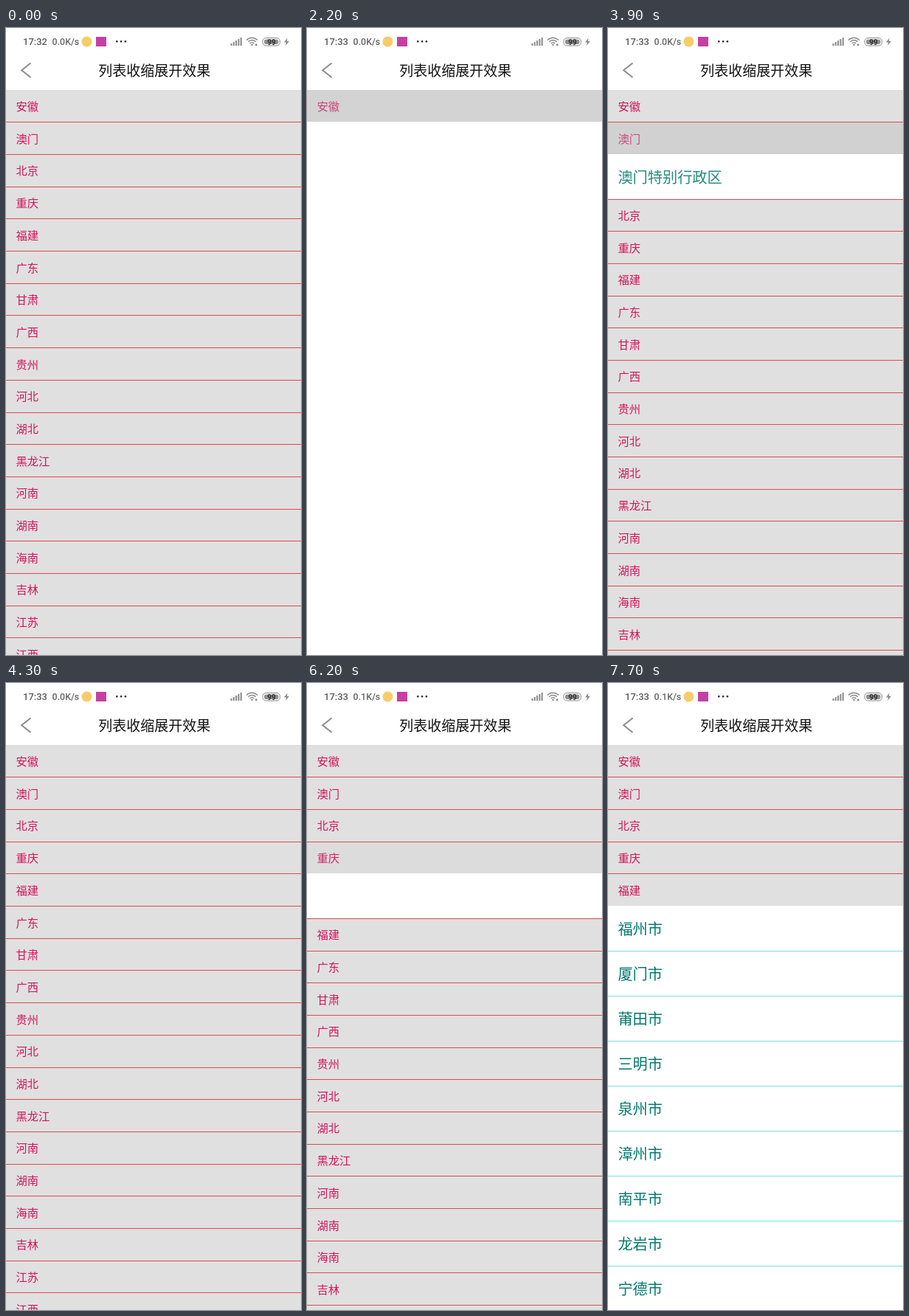
Recreate the animation shown at these times as an HTML page with a canvas. Size 400 by 850 pixels, loop 8000 ms.

```html
<!DOCTYPE html>
<html lang="zh-CN">
<head>
<meta charset="utf-8">
<title>列表收缩展开效果</title>
<style>
  html, body { margin: 0; width: 100%; height: 100%; overflow: hidden; background: #fff; }
  canvas { display: block; width: 400px; height: 850px; }
</style>
</head>
<body>
<canvas id="stage"></canvas>
<script>
const W = 400, H = 850, LOOP = 8000, STEP = 100;
const TOP = 84.2, ROW = 43.68, CHILD = 60.98, DIVIDER = 0.4;
const CJK = '"Noto Sans CJK SC", "Noto Sans CJK", sans-serif';
const LATIN = 'Roboto, sans-serif';

const groups = '安徽 澳门 北京 重庆 福建 广东 甘肃 广西 贵州 河北 湖北 黑龙江 河南 湖南 海南 吉林 江苏 江西'.split(' ');
const cities = {
  安徽: '合肥市 芜湖市 蚌埠市 淮南市 马鞍山市 淮北市 铜陵市 安庆市 黄山市 滁州市 阜阳市 宿州市 六安市 亳州市 池州市 宣城市'.split(' '),
  澳门: ['澳门特别行政区'],
  北京: ['北京市'],
  重庆: ['重庆市'],
  福建: '福州市 厦门市 莆田市 三明市 泉州市 漳州市 南平市 龙岩市 宁德市'.split(' ')
};

// Taps on group headers: each one toggles its group.
const taps = [
  { name: '澳门', at: 1010, open: true },
  { name: '安徽', at: 2010, open: true },
  { name: '安徽', at: 2964.5, open: false },
  { name: '澳门', at: 3885, open: false },
  { name: '北京', at: 4650, open: true },
  { name: '北京', at: 5310, open: false },
  { name: '重庆', at: 5950, open: true },
  { name: '重庆', at: 6570, open: false },
  { name: '福建', at: 7250, open: true }
];
const FADE = 120, MOVE = 250;
const stalls = [4000, 6900];

const canvas = document.getElementById('stage');
const ctx = canvas.getContext('2d');
const scale = window.devicePixelRatio || 1;
canvas.width = W * scale;
canvas.height = H * scale;

const clamp = x => Math.min(1, Math.max(0, x));
const ease = x => 0.5 - Math.cos(clamp(x) * Math.PI) / 2;

function rect(x, y, w, h, color) {
  ctx.fillStyle = color;
  ctx.fillRect(x, y, w, h);
}

function text(str, x, y, font, color, align = 'left') {
  ctx.font = font;
  ctx.fillStyle = color;
  ctx.textAlign = align;
  ctx.fillText(str, x, y);
}

function path(points, color, width) {
  ctx.beginPath();
  points.forEach(([x, y]) => ctx.lineTo(x, y));
  if (width) {
    ctx.strokeStyle = color;
    ctx.lineWidth = width;
    ctx.stroke();
  } else {
    ctx.fillStyle = color;
    ctx.fill();
  }
}

function pill(x, y, w, h, r, color, stroke) {
  ctx.beginPath();
  ctx.roundRect(x, y, w, h, r);
  if (stroke) {
    ctx.strokeStyle = color;
    ctx.lineWidth = 1;
    ctx.stroke();
  } else {
    ctx.fillStyle = color;
    ctx.fill();
  }
}

// Opening moves rows first, then fades children in; closing does the reverse.
function groupState(name, t) {
  const state = { size: 0, alpha: 0, press: 0 };
  for (const tap of taps) {
    if (tap.name !== name) continue;
    const s = t - tap.at;
    state.press = Math.max(state.press, 0.36 * Math.min(clamp((s + 60) / 60), clamp((285 - s) / 110)));
    if (s < 0) continue;
    if (tap.open) {
      state.size = ease(s / MOVE);
      state.alpha = clamp((s - MOVE) / FADE);
    } else {
      state.alpha = 1 - clamp(s / FADE);
      state.size = 1 - ease((s - FADE) / MOVE);
    }
  }
  return state;
}

function drawHeader(name, y, first, press) {
  const top = Math.floor(y), bottom = Math.floor(y + ROW);
  rect(0, top, W, bottom - top, '#e0e0e0');
  text(name, 13.5, y + 27.9, '15.3px ' + CJK, '#d4145a');
  if (press) rect(0, top, W, bottom - top, `rgba(180,180,180,${press})`);
  if (!first) rect(0, top, W, 1, '#db4b4f');
}

function drawChildren(list, y, alpha) {
  ctx.globalAlpha = alpha;
  list.forEach((city, i) => {
    const top = y + i * CHILD;
    if (top > H) return;
    text(city, 13.4, top + 38.3, '20.2px ' + CJK, '#00796b');
    if (i < list.length - 1) rect(0, Math.floor(top + CHILD - DIVIDER), W, 1, '#80dede');
  });
  ctx.globalAlpha = 1;
}

function drawList(t) {
  ctx.save();
  ctx.beginPath();
  ctx.rect(0, 84, W, H - 84);
  ctx.clip();
  let y = TOP;
  groups.forEach((name, i) => {
    if (y > H) return;
    const state = groupState(name, t), list = cities[name];
    drawHeader(name, y, i === 0, state.press);
    y += ROW;
    if (!list) return;
    if (state.alpha) drawChildren(list, y, state.alpha);
    y += (list.length * CHILD - DIVIDER) * state.size;
  });
  ctx.restore();
}

function drawStatus(t) {
  const grey = '#8a8a8a';
  text(t < 2000 ? '17:32' : '17:33', 23, 23, '500 13px ' + LATIN, '#5c5c5c');
  text(t < 6000 ? '0.0K/s' : '0.1K/s', 62.6, 23, '500 12.4px ' + LATIN, '#666');

  ctx.beginPath();
  ctx.arc(109.5, 18.5, 7, 0, Math.PI * 2);
  ctx.fillStyle = '#f5cd68';
  ctx.fill();
  rect(122, 12, 14, 13, '#c640a4');
  for (let i = 0; i < 3; i++) pill(149 + i * 5.8, 17, 2.6, 2.6, 0.8, '#333');

  for (let i = 0; i < 5; i++) {
    const h = 3 + i * 2;
    rect(304.5 + i * 3.3, 24 - h, 2, h, grey);
  }

  ctx.strokeStyle = grey;
  ctx.lineWidth = 1.5;
  for (const r of [3.8, 7, 10.2]) {
    ctx.beginPath();
    ctx.arc(333.5, 23.5, r, -Math.PI * 0.76, -Math.PI * 0.24);
    ctx.stroke();
  }
  pill(332.2, 21.5, 2.6, 2.6, 1.3, grey);
  rect(338, 21.5, 2.5, 2.5, grey);

  pill(348, 13.5, 23.5, 10.5, 4.5, grey, true);
  pill(350, 15.5, 19.5, 6.5, 2.8, '#8f8f8f');
  text('99', 360, 22.5, '700 10px ' + LATIN, '#333', 'center');
  path([[381.5, 13.5], [377, 19.5], [380, 19.5], [379, 24], [384, 17.8], [381, 17.8]], grey);
}

function drawTitle() {
  path([[33.5, 47.5], [21.2, 57.2], [33.5, 67]], '#8c8c8c', 2);
  text('列表收缩展开效果', 201.2, 64.6, '19px ' + CJK, '#111', 'center');
}

function draw(time) {
  let t = Math.floor((time % LOOP) / STEP) * STEP;
  if (stalls.includes(t)) t -= STEP;
  ctx.setTransform(scale, 0, 0, scale, 0, 0);
  rect(0, 0, W, H, '#fff');
  drawList(t);
  drawStatus(t);
  drawTitle();
}

const start = performance.now();
function tick() {
  draw(performance.now() - start);
  requestAnimationFrame(tick);
}
tick();
</script>
</body>
</html>
```
